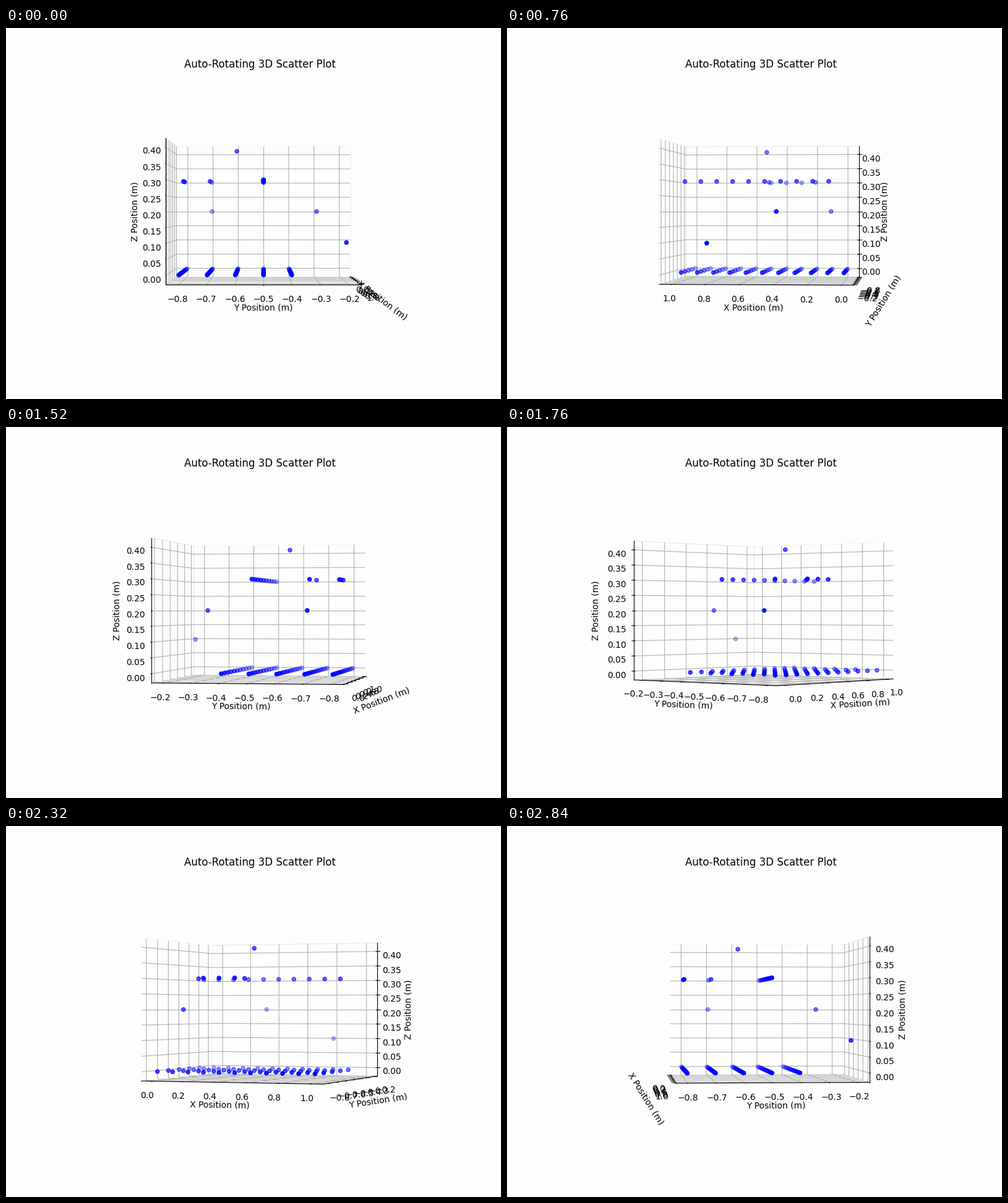
Animation, 800 px wide and 600 px high, one loop 2.88 s. Source, as a matplotlib script:

```python
import numpy as np
import matplotlib.pyplot as plt
from matplotlib.animation import FuncAnimation

STEP = 5           # degrees per frame
INTERVAL = 40      # ms
BACKGROUND = "#fdfdfd"


def row(cols, y, z):
    """Points along x, spaced a tenth apart."""
    return [(i / 10, y, z) for i in cols]


points = []
for j in range(4, 9):
    points += row(range(11), -j / 10, 0)      # floor grid
points += row(range(1, 11), -0.5, 0.3)        # raised rows
points += row(range(3, 6), -0.8, 0.3)
points += row((2, 5), -0.7, 0.3)
points += row([5], -0.6, 0.4)                 # single points
points += row([1], -0.7, 0.2)
points += row([4], -0.3, 0.2)
points += row([8], -0.2, 0.1)

fig = plt.figure(figsize=(8, 6), dpi=100, facecolor=BACKGROUND)
ax = fig.add_subplot(projection="3d", facecolor=BACKGROUND)
ax.scatter(*np.transpose(points), c="blue", marker="o")
ax.set_title("Auto-Rotating 3D Scatter Plot")
ax.set_xlabel("X Position (m)")
ax.set_ylabel("Y Position (m)")
ax.set_zlabel("Z Position (m)")

# Only the outline of the wall across y stands out from the background
for axis in (ax.xaxis, ax.yaxis, ax.zaxis):
    axis.pane.fill = False
ax.yaxis.pane.set_alpha(0.75)


def rotate(frame):
    ax.view_init(elev=0, azim=frame * STEP)
    return ()


anim = FuncAnimation(fig, rotate, frames=360 // STEP, interval=INTERVAL,
                     repeat=True, repeat_delay=0)
plt.show()
```
